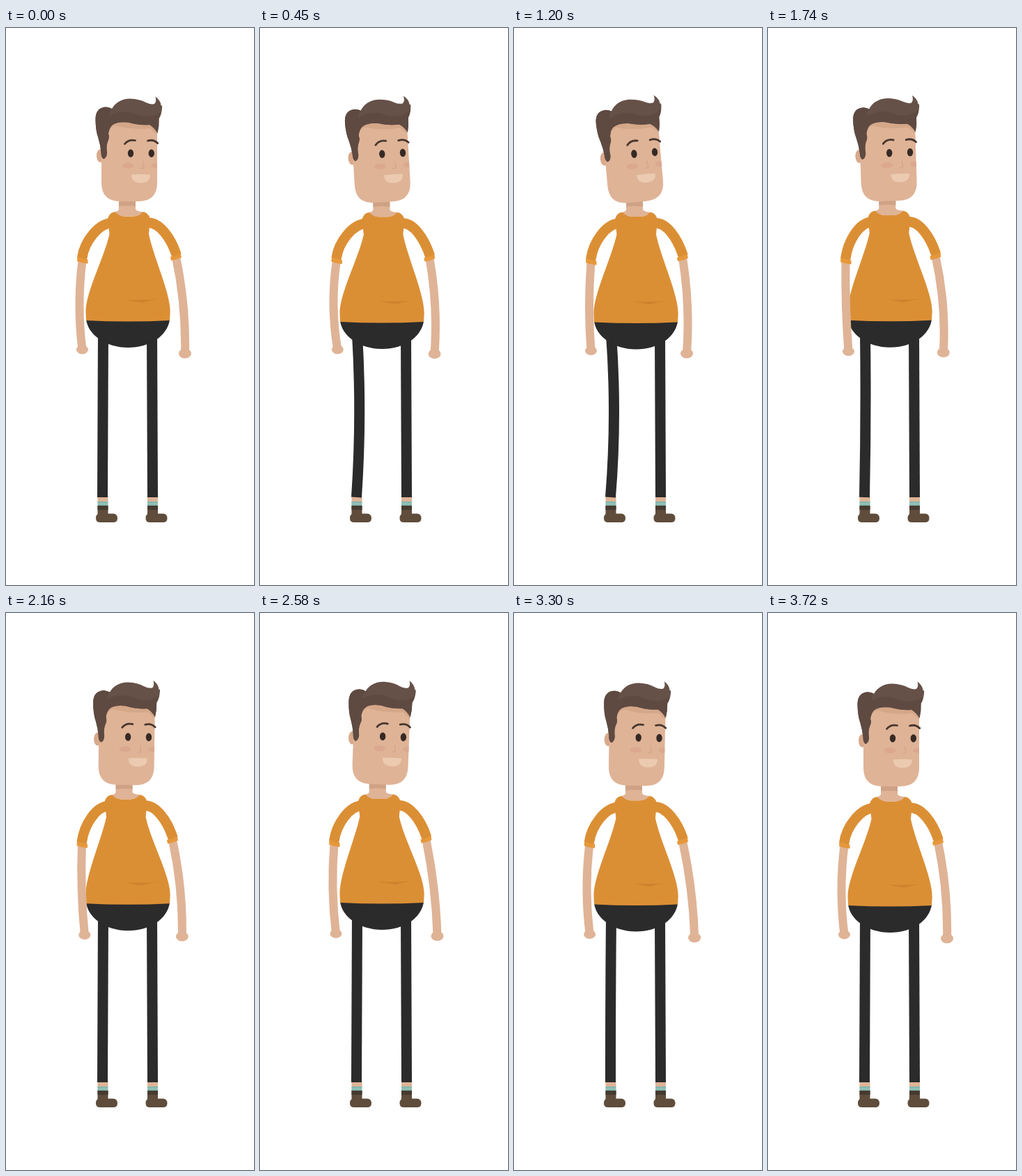
Animation of 356 by 800 pixels, one loop 3.75 s. Source, as an HTML page:

```html
<!DOCTYPE html>
<html lang="en">
<head>
<meta charset="utf-8">
<title>Idle character</title>
<style>
  html, body { margin: 0; width: 100%; height: 100%; overflow: hidden; background: #fff; }
  svg { display: block; width: 100vw; height: 100vh; }
  .skin { fill: #dfb396; }
  .shirt { fill: #db8f35; }
  .dark { fill: #2b2b2b; }
  .limb { fill: none; stroke-linecap: butt; }
  .leg { stroke: #2b2b2b; stroke-width: 15; }
  .sleeve { stroke: #db8f35; stroke-width: 14.5; stroke-linecap: round; }
  .arm { stroke: #dfb396; stroke-width: 12; }
  .cuff { fill: #e6983a; }
  .brow { fill: none; stroke: #47372f; stroke-width: 2.8; stroke-linecap: round; }
</style>
</head>
<body>
<svg viewBox="0 0 356 800">
  <defs>
    <g id="foot">
      <path class="skin" d="M-7.5 672H7.5V681H-7.5Z"/>
      <path fill="#83b8ae" d="M-7.5 680H7.5V686.5H-7.5Z"/>
      <path fill="#a5c9bf" d="M-7.5 682.6H7.5V683.6H-7.5Z"/>
      <path fill="#5f4c3b" d="M-7.5 686H7.5V697.5H15Q21 698 21 704T15 710H-4Q-10 710 -10 704Q-10 700 -7.5 698Z"/>
      <path fill="#463a2f" d="M-7.5 686H7.5V692H-7.5Z"/>
    </g>
  </defs>

  <use href="#foot" x="139"/>
  <use href="#foot" x="210.5"/>
  <path id="legL" class="limb leg"/>
  <path id="legR" class="limb leg"/>
  <path id="pants" class="dark"/>
  <path id="torso" class="shirt"/>
  <path id="crease" fill="#cd832d" d="M170 390Q195 391.5 221 389Q207 391 196 394.3Q184 393 170 390Z"/>

  <g id="neck">
    <path class="skin" d="M162 242V260Q162 263 156.5 264Q163 270.5 169 270.5H184Q190 270.5 196.5 264Q186 263 186 260V242Z"/>
    <path fill="#cfa286" d="M162 247H186V256Q174 254.500 162 256Z"/>
  </g>

  <path id="armL" class="limb arm"/>
  <ellipse id="handL" class="skin" rx="8.500" ry="6.500"/>
  <path id="sleeveL" class="limb sleeve"/>
  <path id="cuffL" class="cuff" d="M-6.800 -5.500Q0 -2.500 8 -1.500L8 4.500Q0 4 -7.500 1Z"/>

  <path id="armR" class="limb arm"/>
  <ellipse id="handR" class="skin" rx="9" ry="7"/>
  <path id="sleeveR" class="limb sleeve"/>
  <path id="cuffR" class="cuff" d="M-8 -.5Q0 -2 6.500 -5.500L8 .5Q1 4 -7 5Z"/>

  <g id="head">
    <ellipse cx="135.500" cy="183.500" rx="5.500" ry="9.500" fill="#d9a98b"/>
    <path class="skin" d="M137 135H217V222Q217 249 190 249H164Q137 249 137 222Z"/>
    <path fill="#d5a789" d="M147 152Q149 142 157 140Q180 147 207 144L217 153V132H147Z"/>
    <path class="skin" d="M147 160Q149 145 158 143Q180 146 206 145L217 156V170H147Z"/>
    <g fill="#dba88f">
      <ellipse cx="175" cy="197.500" rx="8.500" ry="4"/>
      <path d="M217 193.500Q208 194 208 197.500T217 201.500Z"/>
    </g>
    <path fill="none" stroke="#d3a184" d="M196.500 191Q197 197 198 200Q197 202.500 193 201.500"/>
    <path fill="#ebcab0" d="M180 210.500Q193 209.500 207 210.500Q207 222.500 193.500 222.500T180 210.500Z"/>
    <g fill="#362a25">
      <ellipse cx="179" cy="180" rx="4.200" ry="5.800"/>
      <ellipse cx="208.800" cy="180" rx="4.200" ry="5.800"/>
    </g>
    <path class="brow" d="M170.500 166.500Q176 159.500 185.500 161.500"/>
    <path class="brow" d="M203.500 162Q212 159.500 217.800 165.500"/>
    <path fill="#665148" d="M140 188Q136.500 186 136.500 178Q135.500 168 132.500 158Q128.500 147 128.500 130Q129 114 144 113.500Q149 114 152 116Q160 102 178 101.500Q192 102 201 107Q208 110.500 213 109Q216.500 106 214.500 98.500Q222 104 222.500 111Q224 113 224 109Q225 121 219.500 130Q220 141 217.500 151Q213 143 206 139Q190 140 175 135.500Q160 134 153 139Q148 143 147 152Q149 157 146 163Q143.500 170 145 179Q144.500 187 140 188Z"/>
    <path fill="#5e4a41" d="M140 188Q136.500 186 136.500 178Q135.500 168 132.500 158Q128.500 147 128.500 130Q129 114 144 113.500Q149 114 152 116Q147 122 149 126Q165 117 182 122Q205 133 223 120Q222 127 219.500 130Q220 141 217.500 151Q213 143 206 139Q190 140 175 135.500Q160 134 153 139Q148 143 147 152Q149 157 146 163Q143.500 170 145 179Q144.500 187 140 188Z"/>
  </g>
</svg>

<script>
const LOOP = 3750, SPAN = 3720;
const times = [0, 780, 1200, 1740, 2580, 2940];

// One value per entry in times.
const tracks = {
  hip:    [0, 3, 2.5, -.2, -4, -2.6],
  chestX: [0, 0, -1, -2.7, -5.2, -4],
  chestY: [0, 1, .5, -1.5, -3.5, -2.5],
  headX:  [0, -3, -3.5, -3.6, -4.2, -2.6],
  headY:  [0, 0, -.5, -1, -2.2, -1.5],
  tilt:   [0, -5.3, -5.1, -1.9, 2.1, 1.6],
  knee:   [139, 144.7, 143.5, 140, 138.8, 139],
  cuffLX: [109.5, 110, 110.5, 111.5, 106.5, 107],
  cuffLY: [334, 335, 336, 335, 331.5, 332.5],
  midL:   [105.5, 106, 108, 112, 104.5, 104],
  handLX: [109.5, 112, 110.5, 115.5, 109, 108.5],
  handLY: [462, 462, 463.5, 464.5, 460.5, 461],
  cuffRX: [244, 242.5, 242, 240.5, 238.5, 240],
  cuffRY: [329, 331, 330, 328, 325.5, 327],
  midR:   [254.5, 249, 249, 251, 249.5, 252],
  handRX: [257, 247, 248, 251.8, 254.5, 258.4],
  handRY: [467.5, 468, 467.5, 466, 464, 465]
};

const $ = id => document.getElementById(id);
const set = (id, attrs) => { for (const k in attrs) $(id).setAttribute(k, attrs[k]); };
const move = (id, x, y) => set(id, { transform: `translate(${x} ${y})` });

// Periodic cubic interpolation with uneven key spacing.
function sample(values, t) {
  const n = times.length;
  const at = i => values[(i + n) % n];
  const when = i => times[(i + n) % n] + Math.floor(i / n) * SPAN;
  const slope = i => (at(i + 1) - at(i)) / (when(i + 1) - when(i));
  const tangent = i => {
    const a = when(i) - when(i - 1), b = when(i + 1) - when(i);
    return (slope(i - 1) * b + slope(i) * a) / (a + b);
  };
  let i = n - 1;
  while (times[i] > t) i--;
  const h = when(i + 1) - when(i), u = (t - when(i)) / h, v = 1 - u;
  return v * v * (1 + 2 * u) * at(i) + u * u * (3 - 2 * u) * at(i + 1)
    + h * u * v * (v * tangent(i) - u * tangent(i + 1));
}

function drawArm(side, p, shoulder, bend) {
  const x = p[`cuff${side}X`], y = p[`cuff${side}Y`];
  const hx = p[`hand${side}X`], hy = p[`hand${side}Y`];
  const mid = 2 * p[`mid${side}`] - (x + hx) / 2;
  set('arm' + side, { d: `M${x} ${y}Q${mid} ${(y + hy) / 2} ${hx} ${hy}` });
  set('hand' + side, { cx: hx, cy: hy });
  set('sleeve' + side, {
    d: `M${shoulder[0]} ${shoulder[1]}C${bend[0]} ${bend[1]} ${x + bend[2]} ${y - 26} ${x} ${y - 5}`
  });
  move('cuff' + side, x, y);
}

function draw(p) {
  const X = x => x + p.chestX, Y = y => y + p.chestY, H = y => y + p.hip;

  set('legL', { d: `M139.500 ${H(438)}Q${2 * p.knee - 139} ${H(555)} 138.500 674` });
  set('legR', { d: `M209.500 ${H(438)}Q209.500 555 210.500 674` });
  set('pants', {
    d: `M115 ${H(418)}C117 ${H(440)} 143 ${H(459)} 175 ${H(459)}S232 ${H(442)} 235.200 ${H(418)}Z`
  });
  set('torso', {
    d: `M${X(146)} ${Y(274)}Q${X(149)} ${Y(264)} ${X(157)} ${Y(264)}`
      + `Q${X(164)} ${Y(270.5)} ${X(170)} ${Y(270.5)}H${X(183)}Q${X(190)} ${Y(270.5)} ${X(196)} ${Y(264)}`
      + `Q${X(204)} ${Y(264.5)} ${X(207)} ${Y(274)}L${X(205)} ${Y(296)}`
      + `C${X(212)} ${Y(330)} 236 ${H(380)} 235.700 ${H(408)}L235 ${H(420)}`
      + `Q175 ${H(423)} 115 ${H(420)}L114.500 ${H(408)}`
      + `C114 ${H(380)} ${X(141)} ${Y(330)} ${X(148.5)} ${Y(296)}Z`
  });
  move('crease', p.chestX * .2, p.hip * 1.1);
  move('neck', p.chestX, p.chestY);

  drawArm('L', p, [X(153), Y(280)], [X(132), Y(280), 3]);
  drawArm('R', p, [X(202), Y(280)], [X(220), Y(277), -7]);

  set('head', {
    transform: `translate(${p.headX} ${p.headY}) rotate(${p.tilt} 193 216)`
  });
}

const start = performance.now();
function tick() {
  const t = Math.min((performance.now() - start) % LOOP, SPAN) % SPAN;
  const pose = {};
  for (const k in tracks) pose[k] = sample(tracks[k], t);
  draw(pose);
  requestAnimationFrame(tick);
}
tick();
</script>
</body>
</html>
```
